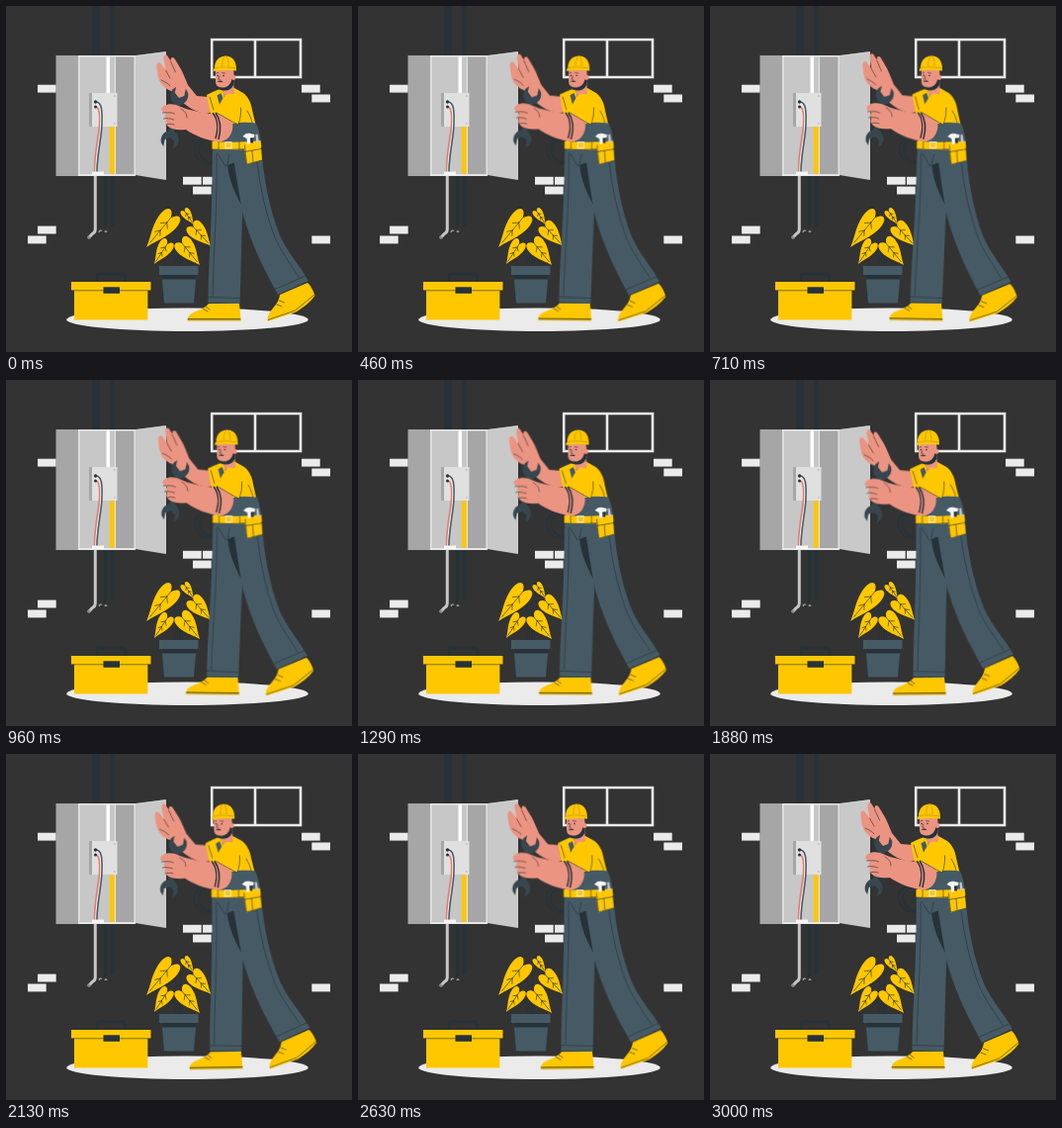
Write an HTML page that moves like this. It is 350 px wide and 350 px high and loops after 3040 ms.

```html
<!DOCTYPE html>
<html lang="en">
<head>
<meta charset="utf-8">
<title>Electrician at work</title>
<style>
html, body { margin: 0; width: 100%; height: 100%; overflow: hidden; background: #333; }
svg { display: block; width: 100vw; height: 100vh; }
#man { transform-origin: 233px 184px; }
.light { fill: #ebebeb; }
.navy { fill: #263238; }
.steel { fill: #37474f; }
.slate { fill: #455a64; }
.gold { fill: #ffc700; }
.skin { fill: #eb9481; }
.ink { fill: none; stroke: #263238; stroke-width: .6; stroke-linecap: round; stroke-linejoin: round; }
</style>
</head>
<body>
<svg viewBox="0 0 350 350">
  <rect width="350" height="350" fill="#333"/>
  <g id="bricks" class="light"></g>
  <path d="M208.200 34H298v38H208.200ZM252 34V72" fill="none" stroke="#ebebeb" stroke-width="2.600"/>
  <ellipse class="light" cx="183.500" cy="317.200" rx="122.300" ry="11.800"/>

  <g id="pipes">
    <path class="navy" d="M87 0h8v51h-8ZM105 0h4.500v51H105ZM98.800 171h3v54h-3ZM105.500 171h4v52h-4Z"/>
    <path d="M90.300 171V226q0 3-3 4.500L84.500 233.500" fill="none" stroke="#c7c7c7" stroke-width="3"/>
    <g fill="none" stroke="#a6a6a6" stroke-width="1.200">
      <circle cx="84" cy="234" r="1.200"/><path d="M94 229q1-3 3-1.500M100 229q1-3 2 0"/>
    </g>
  </g>

  <g id="cabinet">
    <path d="M50.500 50H73V172H50.500Z" fill="#a6a6a6"/>
    <path d="M73 50h58v122H73Z" fill="#e6e6e6"/>
    <path d="M74.500 51.500H110V170H74.500Z" fill="#c7c7c7"/>
    <path d="M111 51.500h18.500V170H111Z" fill="#a6a6a6"/>
    <path d="M101.500 51.500h3.500V89h-3.500Z" fill="#fff"/>
    <path class="gold" d="M104.800 121h5v49h-5Z"/>
    <path d="M84 88h5v34h-5Z" fill="#a6a6a6"/>
    <path d="M87 88h25.500v34H87Z" fill="#e0e0e0"/>
    <g fill="none" stroke-width="1.500">
      <path d="M90.500 102c4 0 4.500 7 4 18s-5 27-5 48" stroke="#eb7564"/>
      <path d="M91 99.500c5 0 5 8 4.800 21s-5 28-5 47" stroke="#f5f5f5" stroke-width=".8"/>
      <path d="M91 97c6 0 6.500 9 6 23s-5 31-5 48" stroke="#455a64"/>
    </g>
    <circle class="navy" cx="90.500" cy="97" r="1.700"/><circle class="navy" cx="90.500" cy="102" r="1.500"/>
    <g fill="#a6a6a6"><circle cx="109.800" cy="91" r=".7"/><circle cx="109.800" cy="119" r=".7"/></g>
    <path d="M87 167.500h12v3.500H87Z" fill="#f5f5f5"/>
    <path d="M130.800 50.300 161.800 46.300V176l-31-5Z" fill="#c9c9c9"/>
    <path d="M130.800 50.500 161.500 46.500V175.500" fill="none" stroke="#e0e0e0" stroke-width=".7"/>
  </g>

  <g id="plant">
    <g class="ink">
      <path d="M168 214c6 18 4 34 6 50M181 208c-5 18-6 35-5 55M188 224c-7 13-9 26-10 39M164 240c4 8 7 15 8 23M179 240c-2 7-3 15-3 23"/>
    </g>
    <g id="leaves"></g>
    <path class="slate" d="M157.500 271h35l-2.500 29.500h-30Z"/>
    <path class="navy" d="M157.500 271.500h35l-.5 5h-34Z"/>
    <path class="slate" d="M155 263h39.500v9H155Z"/>
  </g>

  <g id="toolbox">
    <path d="M92.500 279v-6q0-2 2-2h24q2 0 2 2v6" fill="none" stroke="#263238" stroke-width="3.200"/>
    <path class="gold" d="M69 287h74.400v30.500H69Z"/>
    <path class="gold" d="M66 279h80.500v8.800H66Z"/>
    <path class="ink" d="M66 287.800h80.500"/>
    <path class="navy" d="M98.500 284.300H115v6.500H98.500Z"/>
  </g>

  <g id="man">
    <g fill="none" stroke="#263238" stroke-width="1.500">
      <path d="M213 128c-11 4-20 7-22 14-2 9 5 18 14 18 8 0 12-7 12-17"/>
      <path d="M212 130c-8 4-17 8-17 15 0 7 6 13 11 13 6 0 10-8 10-18"/>
    </g>

    <g id="rearArm">
      <path class="skin" d="M152.400 61c-.2-4 3-5 4.800-2l4.300 6-2-11c-.5-5.500 3-6 4.500-2.500l2.500 4c0-4.500 3-4.500 4.500-1.500l6 10c3 6 5 11 7 16l9 11 12 1 4 15-7 2c-12-2-23-9-31-21-5-3-8-3-12-7-5-5-6-12-6.600-20Z"/>
      <path class="ink" d="M161.500 65l4.500 8M166.500 56l5 11M157 75c4 2 7 3 9 6"/>
    </g>

    <g id="legs">
      <path class="gold" d="M184 317c0-4 3-6 8-8 7-3 11-5 13-8h31l1.500 16Z"/>
      <path d="M183.800 316.500h53.700v2h-53.700Z" fill="#d19f00"/>
      <path class="ink" d="M199 306l5 3M202 304l4 3M184 316.500h53"/>
      <path class="gold" d="M277 292l28-12c3 2 6 8 7.500 13-5 7-12 12-19 16.500L265 319c-1.500-4 1-8 4-12 4-5 7-8 8-15Z"/>
      <path class="ink" d="M265.200 317.500l27.300-9.500 19.500-16M274 302l5 2M276.500 298l5 2"/>
      <path class="slate" d="M209 143h40c-4 17-8 35-9 52-2 35-2 68-3.500 106l-32-1c0-28 2-56 3-84 1-25 1-49 1.500-73Z"/>
      <path class="navy" d="M224 161l13-5 9 58-7-11c-7-13-13-25-15-42Z"/>
      <path class="slate" d="M228 143h30.300c2 30 8 62 18.700 89 8 18 20 30 29 46l-31 14c-13-24-25-47-33-74-5-16-7-37-14-75Z"/>
      <path class="ink" d="M204.500 294.500l32 1M272 286.500l31-13.500M226 150c-2 8-1 10-4 12l-8-13M254 158c3 26 9 52 18 76 6 14 15 26 24 40M213 150c1 49-3 97-4 143"/>
    </g>

    <g id="torso">
      <path class="gold" d="M203 90c6-3 12-6 18-7h10l9 5c5 4 8 10 9 17l4 17 3 16h-46v-28l-3-1Z"/>
      <path class="slate" d="M229 119c8-1.500 17-1.500 24-.5 3 7 4 13 5 20h-43c5-5 10-12 14-19.500Z"/>
      <path class="slate" d="M213.500 90.500l4-2.500 6 16-5 5Z"/>
      <path class="ink" d="M220 86l1 6 9-4M244 106c3 5 4 8 5 12M206 92l4 13"/>
      <path class="gold" d="M208.500 137c17 1 33 1 49-1l1 7c-17 3-33 3-50 2Z"/>
      <path class="ink" d="M215 137.500v7M236 137.500v7.500M208.500 145c17 1 33 0 50-2"/>
      <path d="M222 137.800h6v6h-6Z" fill="none" stroke="#ebebeb" stroke-width="1.100"/>
    </g>

    <g id="pouch">
      <path class="navy" d="M246.500 129.500l2.500-1 1 10h-3Z"/>
      <path d="M252.500 130l2-.5 1.500 9h-3Z" fill="#c7c7c7"/>
      <path d="M239.500 132c2-3 5-4 8-3l4 1-.5 3-4 .5.5 9-3 .5-1-9Z" fill="#f5f5f5"/>
      <path class="gold" d="M240.500 140.500l17-3 1.500 18.500-15.500 4.500Z"/>
      <path class="ink" d="M241 147.500l17.500-3M249 146.500l1 11.500M241.500 141l2 19 15.500-4"/>
    </g>

    <g id="head">
      <path class="skin" d="M220 77h10l1 10c-3 4-7 6-10 6l-1-5Z"/>
      <path class="skin" d="M211.800 64H230l1 10c0 7-4 11-9 11-7 0-10-4-10-9Z"/>
      <path class="navy" d="M231 73c0 8-3 12.300-9 12.500-6 0-9-2-10-6 2 2 5 3.500 8 3 5-.5 8-4 8.500-10Z"/>
      <circle class="skin" cx="230" cy="72.500" r="2.400"/>
      <path class="navy" d="M213.500 76.200c2-1 4-1 6 .2-2 .8-4 .8-6-.2Z"/>
      <circle class="navy" cx="214.300" cy="70.500" r=".8"/><circle class="navy" cx="220" cy="70.500" r=".8"/>
      <path class="ink" d="M212.700 68l2-.5M218.500 67.700l3 .3M216 71l-1.300 3 1.800.2"/>
      <path class="gold" d="M211 63c0-7 4-12 10.500-12.500 7-.4 11.500 5 11.500 13v2c-8-1-15-.5-23.300.5 0-1.500.3-2.300 1.300-3Z"/>
      <g fill="none" stroke="#b88f00" stroke-width=".6">
        <path d="M211 62.800c7-1.500 14-1 22 .2M219 61c-.5-4 0-7 2-10M225 61c0-4 0-7-2-10"/>
      </g>
    </g>

    <!-- Both jaws share one outline, turned half way round for the second. -->
    <g class="steel" transform="translate(170.500 113) rotate(12)">
      <path id="jaw" d="M-2.500 0V-13.500C-8-16-10.500-22-8-27.500L-5-31V-23.500L0-20.500 5-23.500V-31L8-27.500C10.500-22 8-16 2.500-13.500V0Z"/>
      <use href="#jaw" transform="rotate(180)"/>
    </g>

    <g id="frontArm">
      <path class="skin" d="M157 105c1-5 8-7 15-5l10 4c11 3 22 5 31 5h8l8 8c1 6 0 10-3 15-3 4-8 6-14 5-10-2-20-5-30-12-8 1-15 0-19-4-2-2-2-4-1-6-2-2-2-4 0-6-2-1-3.500-2.500-5-4Z"/>
      <path class="ink" d="M158.500 108c4 0 9-1 12 1M159.500 114c4-1 7 0 10 1M162 120c3-1 5-1 8 0M177 104c5 3 6 6 6 9"/>
      <path class="gold" d="M213 108c2-7 5-14 11-19 7-1 12 3 13 9s0 14-2 22c-7-3-14-8-22-12Z"/>
      <path class="ink" d="M213 108c8 4 15 9 22 12 2-6 3-11 2.500-17"/>
      <g fill="none" stroke="#263238" stroke-width="1.500">
        <path d="M209 108c5 6 6 16 3 26M212 108c5 7 6 16 3 27"/>
      </g>
    </g>
  </g>
</svg>
<script>
const NS = 'http://www.w3.org/2000/svg';

function add(parentId, tag, attrs) {
  const el = document.createElementNS(NS, tag);
  for (const key in attrs) el.setAttribute(key, attrs[key]);
  document.getElementById(parentId).append(el);
}

const bricks = [
  [32, 79.7], [299, 79.7], [309.3, 89.5], [179, 172.8], [199, 172.8],
  [189, 182.6], [32, 222.6], [22, 232.5], [309.3, 232.5]
];
for (const [x, y] of bricks) add('bricks', 'rect', { x, y, width: 18.7, height: 7.9 });

// Each leaf runs from its notch (x, y) to its tip (tx, ty), with half-width w.
function leaf(x, y, tx, ty, w) {
  const len = Math.hypot(tx - x, ty - y);
  const turn = Math.atan2(ty - y, tx - x) * 180 / Math.PI;
  const transform = `translate(${x} ${y}) rotate(${turn})`;
  const side = s => `C${-len * .3} ${s * w * .4} ${-len * .2} ${s * w * 1.3} ${len * .25} ${s * w}`
    + `C${len * .55} ${s * w * .8} ${len * .75} ${s * w * .25} ${len} 0`;
  add('leaves', 'path', { d: `M0 0${side(1)}L0 0${side(-1)}Z`, class: 'gold', transform });
  let veins = `M0 0H${len * .85}`;
  for (const k of [.15, .42]) {
    const reach = w * (.5 - k * .4);
    veins += `M${len * k} 0l${len * .12} ${reach}M${len * k} 0l${len * .12} ${-reach}`;
  }
  add('leaves', 'path', { d: veins, class: 'ink', transform });
}
leaf(166.5, 214.5, 142, 244, 10);
leaf(181, 208, 190, 221, 4.6);
leaf(190, 224, 207.5, 243, 8.3);
leaf(163, 241, 150, 261, 7);
leaf(178.5, 240.5, 196, 262, 8.8);

// One sway takes 3000 ms; the rest pose then holds until the loop ends.
const loop = 3040;
const sway = [[0, 0], [750, 1], [2250, -1], [3000, 0], [loop, 0]];
const motion = document.getElementById('man').animate(
  sway.map(([ms, deg]) => ({ offset: ms / loop, transform: `rotate(${deg}deg)` })),
  { duration: loop, iterations: Infinity, easing: 'linear' }
);
motion.startTime = 0;
</script>
</body>
</html>
```
